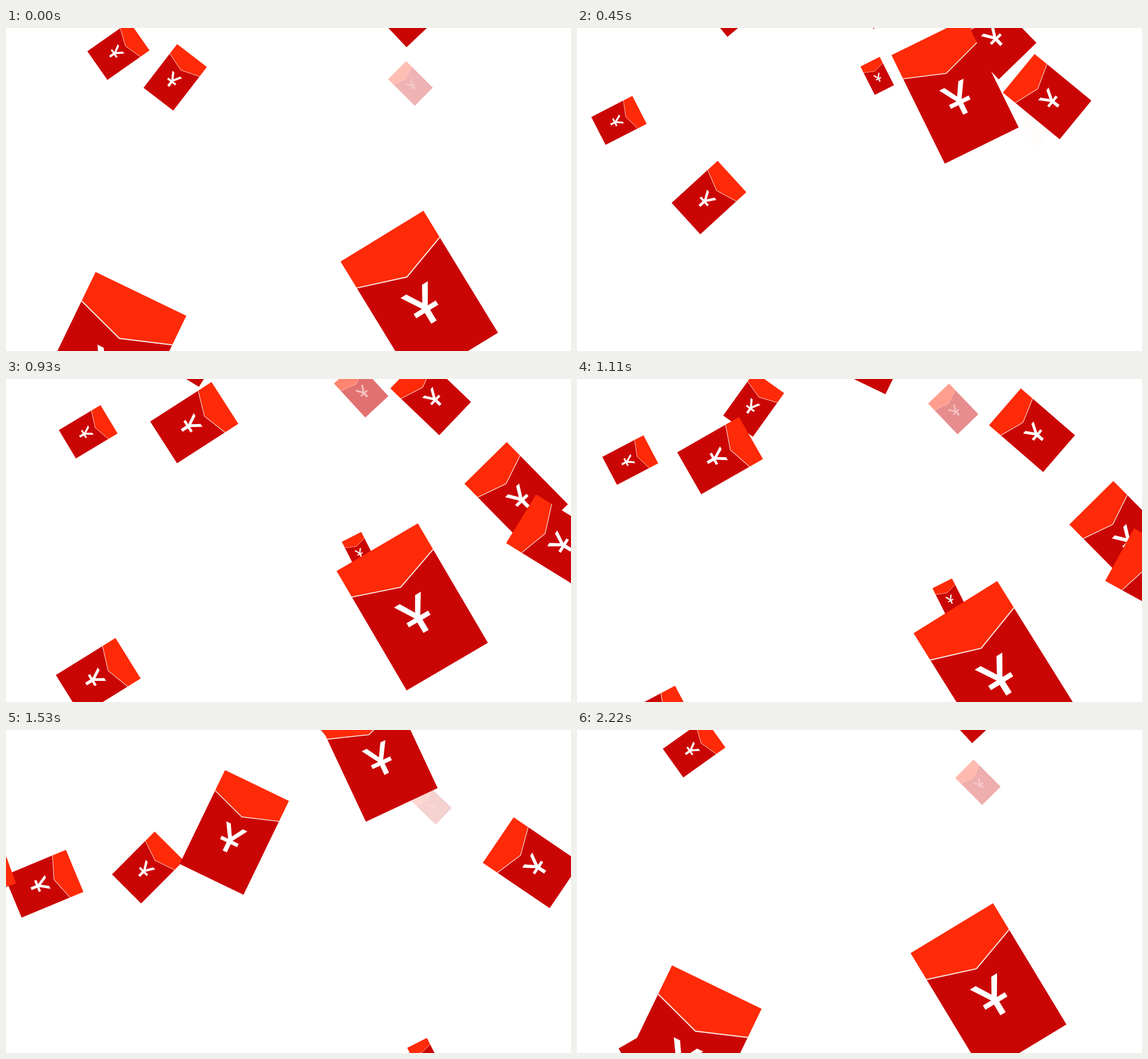
Recreate the animation shown at these times as an HTML page with a canvas. Size 990 px wide and 566 px high, loop 2.25 s.

```html
<!DOCTYPE html>
<html lang="en">
<head>
<meta charset="utf-8">
<title>Red envelope rain</title>
<style>
  html, body { margin: 0; width: 100%; height: 100%; overflow: hidden; background: #fff; }
  canvas { display: block; width: 990px; height: 566px; }
</style>
</head>
<body>
<canvas id="stage" width="990" height="566"></canvas>
<script>
const LOOP = 2250, STEP = 30;
const ctx = document.getElementById('stage').getContext('2d');

// Back to front. Pairs are [value at start, change per second];
// starts: launch times in ms within the loop.
const tracks = [
  { starts: [0, 900, -1350], x: [431.2, 205.5], y: [-154, 186], w: [77.6, -24.2], a: [-37.3, -5.8], o: [1.165, -0.64] },
  { starts: [0], x: [439.8, 191.7], y: [-120.2, 453.5], w: [37.4, 0.8], a: [-26.8, 0] },
  { starts: [0], x: [566.6, 352], y: [-170.5, 400], w: [80.7, 25], a: [-43.6, -1] },
  { starts: [0, 750, 2250], x: [691.1, 294.8], y: [-32.9, 340.4], w: [75.9, 26.1], a: [-43.4, -16] },
  { starts: [0, 1200], x: [296.5, -145], y: [86.5, 468], w: [65.7, 19.3], a: [37.6, 22.1] },
  { starts: [0], x: [738.6, -439.5], y: [-222.5, 321.5], w: [98, -11.9], a: [41.4, 17] },
  { starts: [0, 2250], x: [197, -274.4], y: [40, 271], w: [61.3, -14], a: [55, 17.5] },
  { starts: [0], x: [406.3, -282], y: [-163.8, 275.6], w: [71, -14], a: [41.8, 18.5] },
  { starts: [0, -2250], x: [867.4, -305.5], y: [-677.3, 560], w: [13.4, 72.5], a: [25.8, 0] },
  { starts: [0, 1200, -1050], x: [616.2, 102.8], y: [-159.5, 601], w: [124.6, 43.5], a: [-22.2, -8.8] }
];

// Envelope artwork, 100 units wide
const W = 100, H = 147, FOLD = 32, TIP = 49.2;

function path(...pts) {
  const p = new Path2D();
  for (let i = 0; i < pts.length; i += 2) p.lineTo(pts[i], pts[i + 1]);
  return p;
}

const flap = path(0, 0, W, 0, W, FOLD, W / 2, TIP, 0, FOLD);
const seam = path(0, FOLD, W / 2, TIP, W, FOLD);
const yen = path(
  33, 64.2, 40, 64.2, 49.5, 80.3, 59, 64.2, 66, 64.2, 53, 85.3,
  62.6, 85.3, 62.6, 90.5, 52.7, 90.5, 52.7, 103.4, 46.3, 103.4,
  46.3, 90.5, 36, 90.5, 36, 85.3, 46, 85.3
);

function drawEnvelope(x, y, width, angle, alpha) {
  const k = width / W;
  ctx.save();
  ctx.globalAlpha = alpha;
  ctx.translate(x, y);
  ctx.rotate(angle * Math.PI / 180);
  ctx.scale(k, k);
  ctx.translate(-W / 2, -H / 2);
  // Clip the body to the fold so translucent parts do not stack
  ctx.fillStyle = '#ca0605';
  ctx.fill(path(0, FOLD, W / 2, TIP, W, FOLD, W, H, 0, H));
  ctx.fillStyle = '#ff2a07';
  ctx.fill(flap);
  ctx.strokeStyle = '#f8e8e4';
  ctx.lineWidth = 1.15;
  ctx.stroke(seam);
  ctx.fillStyle = '#fff';
  ctx.fill(yen);
  ctx.restore();
}

function render(t) {
  ctx.fillStyle = '#fff';
  ctx.fillRect(0, 0, 990, 566);
  for (const { starts, x, y, w, a, o = [1, 0] } of tracks) {
    for (const start of starts) {
      const s = (t - start) / 1000;
      const at = ([from, rate]) => from + rate * s;
      const alpha = Math.min(1, at(o));
      if (alpha > 0 && at(w) > 0) drawEnvelope(at(x), at(y), at(w), at(a), alpha);
    }
  }
}

const begin = performance.now();
function tick() {
  const t = (performance.now() - begin) % LOOP;
  render(Math.floor(t / STEP) * STEP);
  requestAnimationFrame(tick);
}
tick();
</script>
</body>
</html>
```
